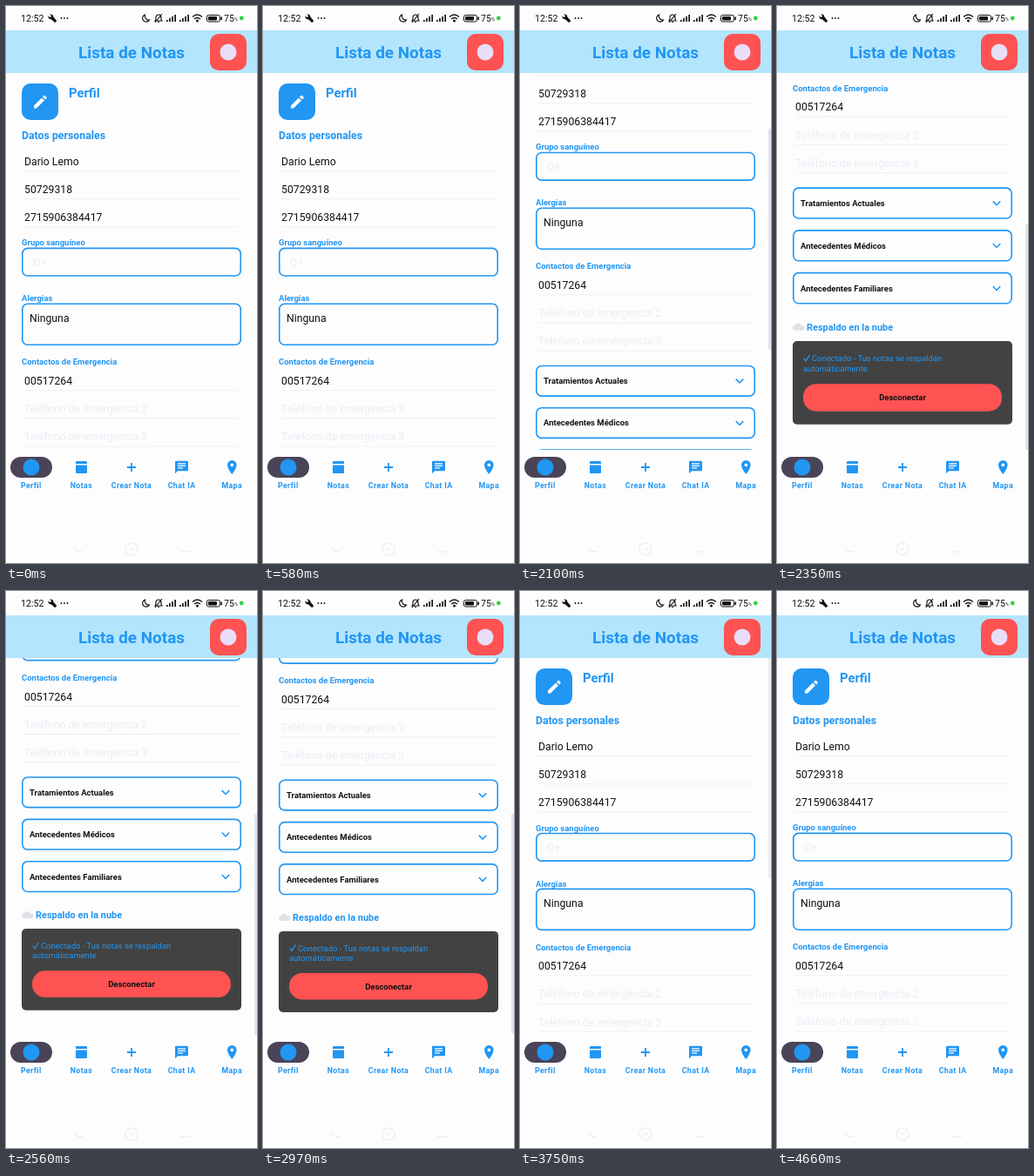
An HTML page with a canvas for the animation above (4.7 s loop, 288 by 640 pixels).

```html
<!DOCTYPE html>
<html lang="es">
<head>
<meta charset="utf-8">
<title>Lista de Notas</title>
<style>
html, body { margin: 0; height: 100%; overflow: hidden; background: #fdfdfe; }
canvas { display: block; }
</style>
</head>
<body>
<canvas id="stage" width="288" height="640"></canvas>
<script>
const ctx = document.getElementById('stage').getContext('2d');
const LOOP = 4700, TOP = 77, BOTTOM = 510, MAX_SCROLL = 308;
const VIEW = BOTTOM - TOP, CONTENT = VIEW + MAX_SCROLL;
const PAPER = '#fdfdfe', BLUE = '#2196f3', RED = '#ff5252', INK = '#111', FAINT = '#ececf4';

const clamp = v => Math.max(0, Math.min(1, v));

// Text is placed by the middle of its capital letters.
function text(str, x, y, size, color, { weight = 400, align = 'left', spacing = 0 } = {}) {
  ctx.font = `${weight} ${size}px Roboto, sans-serif`;
  ctx.letterSpacing = spacing + 'px';
  ctx.textAlign = align;
  ctx.fillStyle = color;
  ctx.fillText(str, x, y + size * 0.355);
}

function box(x, y, w, h, r, fill, stroke, width = 1.6) {
  ctx.beginPath();
  ctx.roundRect(x, y, w, h, r);
  if (fill) { ctx.fillStyle = fill; ctx.fill(); }
  if (stroke) { ctx.strokeStyle = stroke; ctx.lineWidth = width; ctx.stroke(); }
}

function disc(x, y, r, fill) {
  ctx.beginPath();
  ctx.arc(x, y, r, 0, 7);
  ctx.fillStyle = fill;
  ctx.fill();
}

function fillPath(d, color, x = 0, y = 0) {
  ctx.save();
  ctx.translate(x, y);
  ctx.fillStyle = color;
  ctx.fill(new Path2D(d), 'evenodd');
  ctx.restore();
}

function strokePath(d, color, width, x = 0, y = 0) {
  ctx.save();
  ctx.translate(x, y);
  ctx.strokeStyle = color;
  ctx.lineWidth = width;
  ctx.stroke(new Path2D(d));
  ctx.restore();
}

const scrollAt = t => MAX_SCROLL *
  (t < 2600 ? clamp((t - 1880) / 370) ** 2 : 1 - clamp((t - 2930) / 270) ** 2.7);

// Edge stretch: a quick pull that relaxes after the list hits its end.
function pull(t, hit, peak) {
  const u = Math.max(0, t - hit) / 80;
  return peak * u * Math.exp(1 - u);
}

function drawContent(t) {
  const scroll = scrollAt(t), atTop = pull(t, 3200, 10.4), atEnd = pull(t, 2250, 7.5);
  const bend = y => y + atTop * (1 - Math.exp((TOP - y) / 120))
                      - atEnd * (1 - Math.exp((y - BOTTOM) / 150));
  const at = y => bend(y - scroll);
  const frame = (x, y, w, h, r, fill, stroke) =>
    box(x, at(y), w, at(y + h) - at(y), r, fill, stroke);
  const label = (str, y, size, x = 18) =>
    text(str, x, at(y), size, BLUE, { weight: 700 });
  const field = (str, y, color = INK) => {
    text(str, 21, at(y), 12.25, color);
    ctx.fillStyle = '#f0f0f5';
    ctx.fillRect(21, at(y + 10.5), 246, 1);
  };

  ctx.save();
  ctx.beginPath();
  ctx.rect(0, TOP, 288, VIEW);
  ctx.clip();

  frame(18, 89, 42, 42, 10, BLUE);
  fillPath('M-7 7V4L2-5 5-2-4 7ZM3-6 4.5-7.4Q5.2-8 6-7.4L7.4-6Q8-5.2 7.4-4.5L6-3Z', '#fff', 39, at(110.5));
  label('Perfil', 100, 14.8, 72);
  label('Datos personales', 149, 12.3);
  field('Dario Lemo', 178.7);
  field('50729318', 210.7);
  field('2715906384417', 242.7);

  label('Grupo sanguíneo', 272, 9.5);
  frame(18.8, 278.4, 250.4, 31.6, 6, null, BLUE);
  text('O+', 31, at(294.5), 12.25, FAINT);
  label('Alergias', 336, 9.5);
  frame(18.8, 342.2, 250.4, 47, 6, null, BLUE);
  text('Ninguna', 27, at(358.7), 12.25, INK);

  label('Contactos de Emergencia', 409, 9.5);
  field('00517264', 430.7);
  field('Teléfono de emergencia 2', 462.9, FAINT);
  field('Teléfono de emergencia 3', 495, FAINT);

  ['Tratamientos Actuales', 'Antecedentes Médicos', 'Antecedentes Familiares'].forEach((name, i) => {
    const y = 540.7 + i * 48.3;
    frame(18.8, y - 17.3, 250.4, 34.6, 6, null, BLUE);
    text(name, 27, at(y), 9.5, INK, { weight: 700 });
    strokePath('M-4.3-2.2 0 2.2 4.3-2.2', BLUE, 1.5, 252, at(y));
  });

  fillPath('M-4 4A3 3 0 0 1-4-2A4 4 0 0 1 3-2A3 3 0 0 1 4 4Z', '#dfe3e7', 25, at(681));
  label('Respaldo en la nube', 681, 10.95, 34);
  frame(18, 697, 252, 93, 5, '#424242');
  strokePath('M0 0 2 3 6.5-4', BLUE, 1.2, 31, at(716.5));
  text('Conectado - Tus notas se respaldan', 40, at(716.5), 9.4, BLUE);
  text('automáticamente', 30, at(727.5), 9.4, BLUE);
  frame(30, 745, 228, 30.5, 15, RED);
  text('Desconectar', 144, at(760.3), 9.5, INK, { weight: 700, align: 'center' });

  const fade = Math.min(clamp((t - 1880) / 60), 1 - clamp((t - 3650) / 250));
  const thumbTop = TOP + scroll / CONTENT * VIEW;
  const y0 = bend(thumbTop), y1 = bend(thumbTop + VIEW * VIEW / CONTENT);
  ctx.globalAlpha = fade;
  ctx.fillStyle = '#e3e3ea';
  ctx.fillRect(285, y0, 3, y1 - y0);
  ctx.restore();
}

function drawStatusBar() {
  const y = 14;
  text('12:52', 17, y, 10.7, INK);
  fillPath('M-4.5-2.7-2.5-.8-.8-2.5-2.7-4.5Q1-5.2 1.4-1.4L5 2.8Q5.2 4.8 3 5L-1.2 1.2Q-5 1.2-4.5-2.7Z', INK, 53, y);
  for (const x of [63.5, 67, 70.5]) disc(x, y, 0.9, INK);
  strokePath('M-1-4A4.2 4.2 0 1 0 4 2A4.5 4.5 0 0 1-1-4Z', INK, 1.2, 160.5, y);
  strokePath('M-4 3H4L3 1V-1A3 3 0 0 0-3-1V1ZM-1 4.5H1M4-5-4 5', INK, 1.1, 175, y);
  for (const x of [184, 199])
    for (let i = 0; i < 4; i++) {
      ctx.fillStyle = INK;
      ctx.fillRect(x + i * 3.1, 16 - i * 2, 1.7, 2 + i * 2);
    }
  strokePath('M-5.5-1.5Q0-6.5 5.5-1.5M-3.5 1Q0-2 3.5 1', INK, 1.4, 219.5, y);
  disc(219.5, 17, 1.5, INK);
  box(230.5, 10.5, 15, 7.5, 2, null, INK, 1);
  box(232, 12, 10, 4.5, 1, INK);
  ctx.fillRect(246.5, 12.5, 1.5, 3.5);
  text('75', 250, y, 10.5, INK);
  text('%', 262, y + 1.5, 5.5, INK);
  disc(270.3, y, 2.4, '#35cf45');
}

function drawHeader() {
  ctx.fillStyle = '#b3e5fc';
  ctx.fillRect(0, 28, 288, 49);
  text('Lista de Notas', 144, 53.5, 18.9, BLUE, { weight: 700, align: 'center' });
  box(234, 32, 42, 42, 10, RED);
  disc(255, 53, 9.5, '#e8def8');
}

function drawTabs() {
  box(5, 518, 48, 24, 12, '#4a4458');
  disc(29, 530, 9.5, BLUE);
  fillPath('M-6.5-6Q-6.5-7-5.5-7H5.5Q6.5-7 6.5-6V-4H-6.5ZM-6.5-2.6H6.5V6Q6.5 7 5.5 7H-5.5Q-6.5 7-6.5 6Z', BLUE, 86.5, 530);
  strokePath('M-5 0H5M0-5V5', BLUE, 1.8, 144, 530);
  fillPath('M-7.5-6.2Q-7.5-7.3-6.4-7.3H6.4Q7.5-7.3 7.5-6.2V3Q7.5 4.2 6.4 4.2H-4.5L-7.5 7.2Z', BLUE, 201.5, 530);
  strokePath('M-4.5-4.2H4.5M-4.5-1.7H4.5M-4.5 .8H1.5', PAPER, 1.2, 201.5, 530);
  fillPath('M0 8Q-5.3 1.5-5.3-2.7A5.3 5.3 0 0 1 5.3-2.7Q5.3 1.5 0 8ZM-1.9-2.7A1.9 1.9 0 1 0 1.9-2.7A1.9 1.9 0 1 0-1.9-2.7Z', BLUE, 259.3, 530);
  ['Perfil', 'Notas', 'Crear Nota', 'Chat IA', 'Mapa'].forEach((name, i) =>
    text(name, 28.8 + i * 57.6, 551.3, 8.8, BLUE, { weight: 700, align: 'center', spacing: 0.37 }));

  strokePath('M78 623 83 627 88 627M200 627H212', '#efeff5', 1.5);
  strokePath('M137 624A7 7 0 1 0 151 624A7 7 0 1 0 137 624M141 624H147', '#efeff5', 1.5);
}

function render() {
  const t = performance.now() % LOOP;
  ctx.fillStyle = PAPER;
  ctx.fillRect(0, 0, 288, 640);
  drawContent(t);
  drawStatusBar();
  drawHeader();
  drawTabs();
  requestAnimationFrame(render);
}
render();
</script>
</body>
</html>
```
